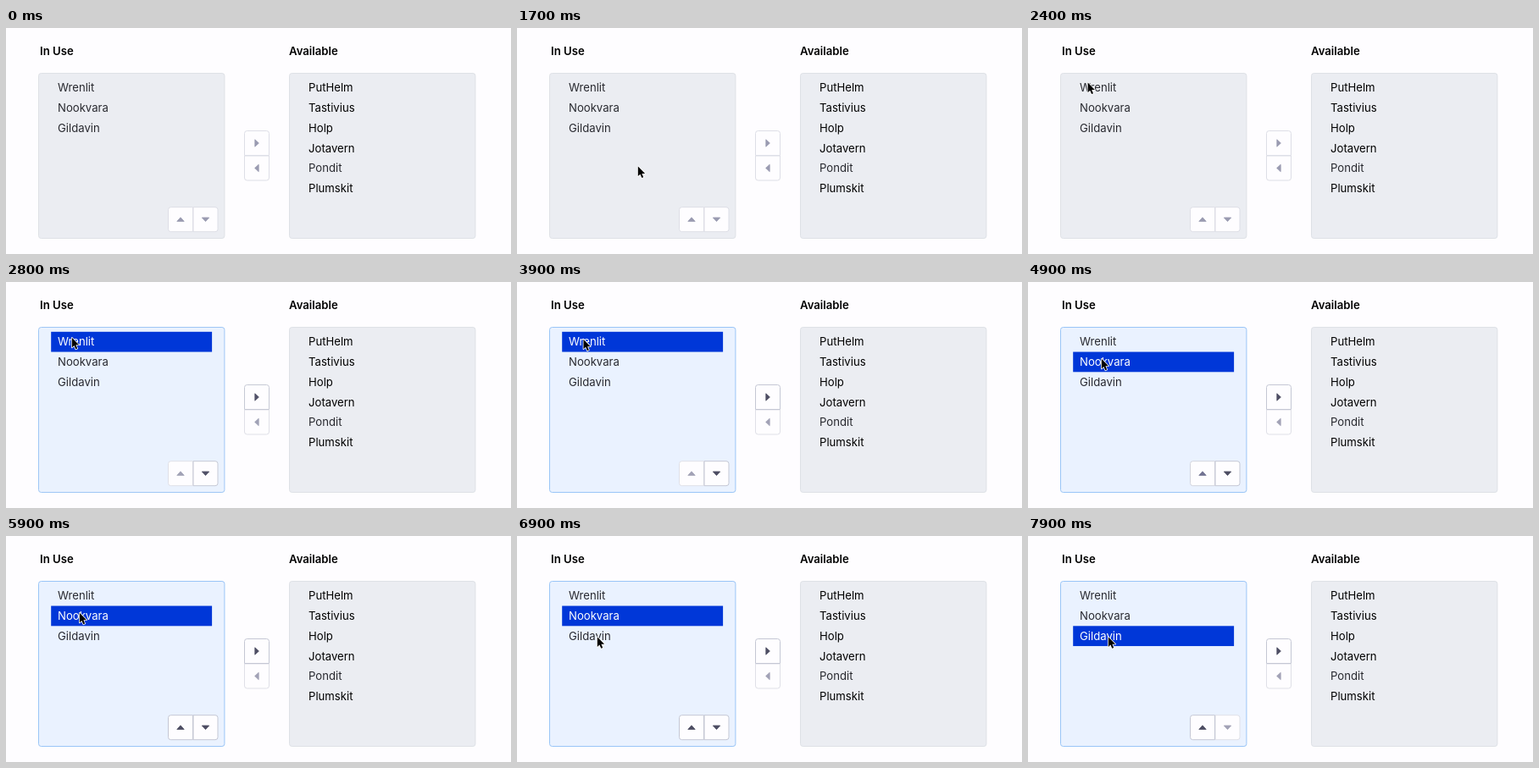
Write an HTML page with a canvas that moves like this. It is 596 px wide and 267 px high and loops after 8 s.

```html
<!DOCTYPE html>
<html lang="en">
<head>
<meta charset="utf-8">
<title>List picker</title>
<style>
  html, body { margin: 0; width: 100%; height: 100%; overflow: hidden; background: #fefdff; }
  canvas { display: block; width: 596px; height: 267px; }
</style>
</head>
<body>
<canvas id="stage"></canvas>
<script>
const WIDTH = 596, HEIGHT = 267, LOOP = 8000, STEP = 100;
const PAPER = '#fefdff', INK = '#000', SOFT_INK = '#28292f';
const ROW_TOP = 58.8, ROW_HEIGHT = 23.75;
const PITCH = 29.5;
const FOCUS_AT = 2700, SECOND_AT = 4900, THIRD_AT = 7000;

const canvas = document.getElementById('stage');
const ctx = canvas.getContext('2d');
const ratio = window.devicePixelRatio || 1;
canvas.width = WIDTH * ratio;
canvas.height = HEIGHT * ratio;

const inUse = ['Wrenlit', 'Nookvara', 'Gildavin'];
const available = ['PutHelm', 'Tastivius', 'Holp', 'Jotavern', 'Pondit', 'Plumskit'];
const mutedName = 'Pondit';

const pointerShape = new Path2D('M0 0v11.6l2.6-2.4 1.9 4.3 1.9-.8-1.8-4.2h3.7z');
const arrowShape = new Path2D('M-2.2-4.2L2.4 0L-2.2 4.2z');

const lerp = (a, b, k) => a + (b - a) * k;
const easeOut = k => 1 - (1 - k) ** 2;
const easeInOut = k => k * k * (3 - 2 * k);

const entry = { x: 207, y: 244 };
const moves = [
  { from: 1200, to: 1300, x: 177, y: 214, ease: easeOut },
  { from: 1600, to: 1700, x: 142.8, y: 163.5, ease: easeOut },
  { from: 1700, to: 2200, x: 50, y: 61, ease: easeOut },
  { from: 2200, to: 2500, x: 77.8, y: 65.8, ease: easeInOut },
  { from: 3800, to: 4400, x: 86.8, y: 90.8, ease: easeInOut },
  { from: 6100, to: 6400, x: 94.8, y: 119.3, ease: easeInOut }
];

function pointerAt(t) {
  let { x, y } = entry;
  for (const move of moves) {
    if (t <= move.from) break;
    const k = move.ease(Math.min(1, (t - move.from) / (move.to - move.from)));
    x = lerp(x, move.x, k);
    y = lerp(y, move.y, k);
  }
  return { x, y };
}

// Starts halfway and settles within a few steps
const fade = (t, start) => t < start ? 0 : 1 - 0.5 * 0.12 ** ((t - start) / STEP);

function text(label, x, y, color, weight = 400) {
  ctx.font = `${weight} 13.15px Inter, sans-serif`;
  ctx.fillStyle = color;
  ctx.fillText(label, x, y);
}

function box(x, y, w, h, radius, fill, border) {
  ctx.beginPath();
  ctx.roundRect(x + 0.5, y + 0.5, w - 1, h - 1, radius);
  ctx.fillStyle = fill;
  ctx.fill();
  ctx.lineWidth = 1;
  ctx.strokeStyle = border;
  ctx.stroke();
}

function panel(x, focus) {
  const fill = `hsl(${lerp(223, 217, focus)}, ${lerp(21, 100, focus)}%, ${lerp(93.5, 95.9, focus)}%)`;
  const border = `hsl(${lerp(218, 212, focus)}, ${lerp(14, 86, focus)}%, ${lerp(88.5, 78.5, focus)}%)`;
  box(x, 53, 220.4, 196, 3, fill, border);
}

// Strength runs from 0 (disabled) to 1 (enabled)
function button({ x, y, corners, angle, strength }) {
  const size = 30;
  box(x, y, size, size, corners, PAPER, `hsl(228, 15%, ${lerp(89, 80, strength)}%)`);
  ctx.save();
  ctx.translate(x + size / 2, y + size / 2);
  ctx.rotate(angle);
  ctx.fillStyle = ctx.strokeStyle = `hsl(239, 12.5%, ${lerp(67.5, 34.5, strength)}%)`;
  ctx.lineJoin = 'round';
  ctx.lineWidth = 0.8;
  ctx.fill(arrowShape);
  ctx.stroke(arrowShape);
  ctx.restore();
}

// The stronger button goes last so its edge covers the shared divider
function buttonPair(...pair) {
  pair.sort((a, b) => a.strength - b.strength).forEach(button);
}

function drawButtons(t, focus) {
  const idle = 0.08;
  const on = lerp(idle, 1, focus), off = lerp(idle, 0, focus);
  const up = lerp(off, 1, fade(t, SECOND_AT));
  const down = lerp(on, 0, fade(t, THIRD_AT));
  const quarter = Math.PI / 2;
  buttonPair(
    { x: 281, y: 121, corners: [3, 3, 0, 0], angle: 0, strength: on },
    { x: 281, y: 121 + PITCH, corners: [0, 0, 3, 3], angle: Math.PI, strength: off }
  );
  buttonPair(
    { x: 191, y: 211.2, corners: [3, 0, 0, 3], angle: -quarter, strength: up },
    { x: 191 + PITCH, y: 211.2, corners: [0, 3, 3, 0], angle: quarter, strength: down }
  );
}

function drawPointer({ x, y }) {
  ctx.save();
  ctx.translate(x, y);
  ctx.lineJoin = 'round';
  ctx.lineWidth = 1.6;
  ctx.strokeStyle = '#fff';
  ctx.stroke(pointerShape);
  ctx.fillStyle = INK;
  ctx.fill(pointerShape);
  ctx.restore();
}

function draw(t) {
  const selected = [FOCUS_AT, SECOND_AT, THIRD_AT].filter(time => t >= time).length - 1;
  const focus = fade(t, FOCUS_AT);
  const baseline = row => 75.3 + row * ROW_HEIGHT;

  ctx.setTransform(ratio, 0, 0, ratio, 0, 0);
  ctx.fillStyle = PAPER;
  ctx.fillRect(0, 0, WIDTH, HEIGHT);
  text('In Use', 40, 32.2, INK, 600);
  text('Available', 334, 32.2, INK, 600);
  panel(38, focus);
  panel(334, 0);

  if (selected >= 0) {
    ctx.fillStyle = '#0037d8';
    ctx.fillRect(53.2, ROW_TOP + selected * ROW_HEIGHT, 189.9, ROW_HEIGHT);
  }
  inUse.forEach((name, row) => text(name, 61, baseline(row), row === selected ? '#fff' : SOFT_INK));
  available.forEach((name, row) => text(name, 357, baseline(row), name === mutedName ? SOFT_INK : INK));

  drawButtons(t, focus);
  if (t >= moves[0].from) drawPointer(pointerAt(t));
}

const begin = performance.now();
function frame() {
  const t = (performance.now() - begin) % LOOP;
  draw(Math.floor(t / STEP) * STEP);
  requestAnimationFrame(frame);
}
frame();
</script>
</body>
</html>
```
